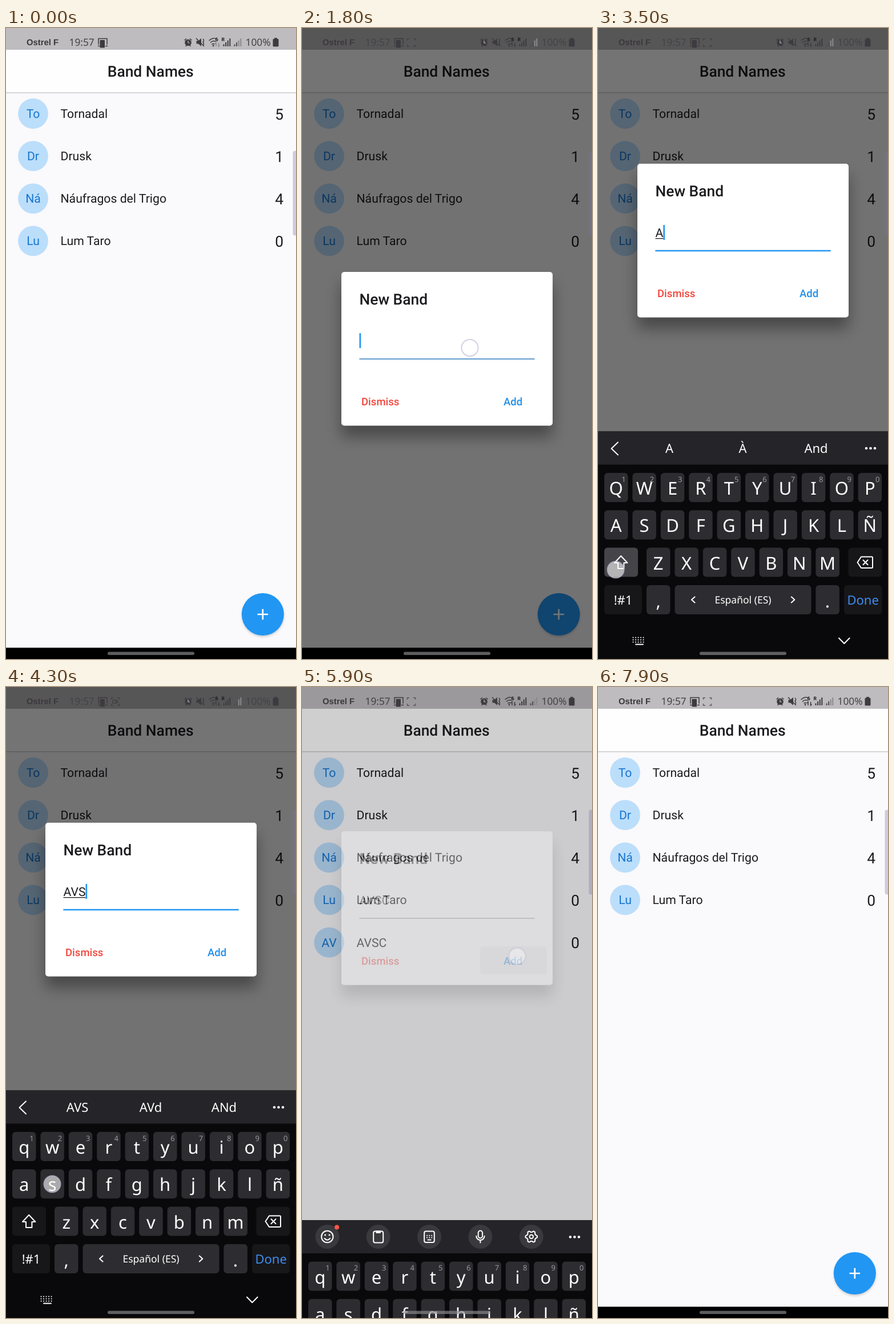
Animation of 508x1102 px, one loop 8 s. Source, as an HTML page:

```html
<!DOCTYPE html>
<html lang="es">
<head>
<meta charset="utf-8">
<title>Band Names</title>
<style>
html, body { margin: 0; width: 100%; height: 100%; overflow: hidden; background: #faf9fc; }
svg { display: block; width: 508px; height: 1102px; }
text { font-family: Roboto, sans-serif; font-size: 21.2px; fill: #1c1b1e; text-rendering: geometricPrecision; }
.title { font-size: 26.4px; font-weight: 500; }
.count { font-size: 26.4px; text-anchor: end; }
.initials { fill: #1976d2; text-anchor: middle; }
.button { font-size: 18.5px; font-weight: 500; }
.status { font: 300 17.3px "Noto Sans", sans-serif; fill: #444246; }
.kb text { font: 300 31px "Noto Sans", sans-serif; fill: #fff; text-anchor: middle; }
.kb .hint { font-size: 13px; fill: #99989c; }
.kb .suggestion { font-size: 22px; font-weight: 400; }
.kb .label { font-size: 22px; font-weight: 400; }
.kb .space { font-size: 17.5px; font-weight: 400; }
.line { fill: none; stroke: #fff; stroke-width: 2; stroke-linecap: round; stroke-linejoin: round; }
.ink { fill: none; stroke: #3d3b3f; stroke-width: 1.5; }
.solid { fill: #3d3b3f; }
</style>
</head>
<body>
<svg id="stage" viewBox="0 0 508 1102"></svg>
<script>
const LOOP = 8000, STEP = 100, ROW = 74.15, NEW_ROW_Y = 409;
const bands = [['Tornadal', 5], ['Drusk', 1], ['Náufragos del Trigo', 4], ['Lum Taro', 0]];
const newBand = ['AVSC', 0];

// Markup helpers
const rect = (x, y, w, h, fill, r = 0, extra = '') =>
  `<rect x="${x}" y="${y}" width="${w}" height="${h}" rx="${r}" fill="${fill}" ${extra}/>`;
const circle = (x, y, r, fill, extra = '') =>
  `<circle cx="${x}" cy="${y}" r="${r}" fill="${fill}" ${extra}/>`;
const text = (x, y, value, cls = '', extra = '') =>
  `<text x="${x}" y="${y}" class="${cls}" ${extra}>${value}</text>`;
const path = (d, cls = 'line', extra = '') => `<path d="${d}" class="${cls}" ${extra}/>`;

const bandRow = ([name, votes], i) => {
  const y = 149.5 + i * ROW;
  return circle(47.5, y, 26.4, '#bbdefb') + text(47.5, y + 7.5, name.slice(0, 2), 'initials') +
    text(95.5, y + 7.5, name) + text(486, y + 10.2, votes, 'count');
};

const trash = `<path transform="translate(13.2 430.6) scale(1.323)" fill="#241313" fill-rule="evenodd"
  d="M6 19c0 1.1.9 2 2 2h8c1.1 0 2-.9 2-2V7H6zM8 9h8v10H8zM15.5 4l-1-1h-5l-1 1H5v2h14V4z"/>`;

const app = () => `
  ${rect(0, 0, 508, 1102, '#faf9fc')}
  ${bands.map(bandRow).join('')}
  <clipPath id="rowClip"><rect id="rowWindow" x="0" width="508"/></clipPath>
  <g id="newRow" clip-path="url(#rowClip)">
    <clipPath id="swipeClip"><rect id="swipeWindow" x="0" y="409" height="75"/></clipPath>
    <g clip-path="url(#swipeClip)">${rect(0, NEW_ROW_Y, 508, ROW, '#f44336')}${trash}</g>
    <g id="swiped">
      <circle id="ripple" cx="255" cy="430" fill="#000" fill-opacity=".028"/>
      ${bandRow(newBand, 4)}
    </g>
  </g>
  ${rect(0, 112, 508, 1.6, '#cdccd0')}${rect(0, 113.6, 508, 1.4, '#eeedf0')}
  ${rect(0, 38, 508, 74, '#fefefe')}
  ${text(253.2, 85.2, 'Band Names', 'title', 'text-anchor="middle"')}
  ${circle(450, 1026.5, 36, '#000', 'opacity=".24" style="filter:blur(2.5px)"')}
  ${circle(449.8, 1024, 37, '#2196f3')}
  ${path('M440.5 1024H459.1M449.8 1014.7V1033.3', 'line', 'style="stroke-width:2.7;stroke-linecap:butt"')}
  ${rect(0, 0, 508, 38, '#bebcbf')}`;

const dialog = () => `
  ${rect(69, 20, 370, 268, '#000', 5, 'opacity=".36" style="filter:blur(13px)"')}
  ${rect(69, 0, 370, 268.5, '#fff', 5)}
  ${text(100.5, 57, 'New Band', 'title')}
  <text id="field" x="100.5" y="127.5"></text>
  ${rect(100.5, 130, 0, 1.3, '#1c1b1e', 0, 'id="composing"')}
  ${rect(0, 107, 2.7, 26, '#2196f3', 0, 'id="caret"')}
  <line id="idleLine" x1="100.5" x2="407.5" y1="152" y2="152" stroke="#8a898c" stroke-width="1.4"/>
  <line id="focusLine" x1="100.5" x2="407.5" y1="152" y2="152" stroke="#2196f3"/>
  ${rect(312, 201, 117, 49, '#000', 5, 'id="addPress" opacity=".06"')}
  ${text(104, 233, 'Dismiss', 'button', 'style="fill:#f0463c"')}
  ${text(353, 233, 'Add', 'button', 'style="fill:#2390ea"')}`;

const PITCH = 49.4;
const keyBox = (x, y, w = 41.5, dark = false, id = '') =>
  rect(x, y, w, 51, dark ? '#171719' : '#2d2c30', 6, id && `id="${id}"`);
const letterRow = (letters, x, y, hints = '') => [...letters].map((c, i) => {
  const left = x + i * PITCH, mid = left + 20.7;
  return keyBox(left, y) + text(mid, y + 38, c, 'letter') +
    (hints ? text(left + 34, y + 15.5, hints[i], 'hint') : '');
}).join('');

const toolIcons = () => `
  ${[44.3, 133.7, 223, 312.4, 401.8].map(x => circle(x, 733.5, 21, '#3a393d')).join('')}
  ${circle(44.3, 733.5, 10.2, 'none', 'class="line"')}
  ${path('M39.5 736.5Q44.3 742 49.1 736.5')}
  ${circle(40.6, 730.5, 1.5, '#fff')}${circle(48, 730.5, 1.5, '#fff')}
  ${circle(61, 717, 4, '#fb5747')}
  ${rect(125.2, 724, 17, 20, 'none', 3, 'class="line"')}${rect(129.5, 723, 8.4, 4.5, '#fff', 1)}
  ${rect(214.2, 724, 17.6, 19.5, 'none', 3, 'class="line"')}
  ${path('M219 731.5h8.5M219 735h8.5', 'line', 'stroke-dasharray="0.1 4"')}${path('M220.5 739h5')}
  ${rect(308.7, 723, 7.4, 13, 'none', 3.7, 'class="line"')}
  ${path('M305.3 732.5a7.1 7.1 0 0 0 14.2 0M312.4 740v4')}
  ${path(gear(401.8, 733.5))}${circle(401.8, 733.5, 3.2, 'none', 'class="line"')}`;

function gear(cx, cy) {
  const points = Array.from({ length: 48 }, (_, i) => {
    const a = i / 48 * Math.PI * 2, r = 9.1 + 1.2 * Math.tanh(3 * Math.cos(a * 6 + Math.PI));
    return `${(cx + r * Math.sin(a)).toFixed(1)} ${(cy + r * Math.cos(a)).toFixed(1)}`;
  });
  return `M${points.join('L')}Z`;
}

const keyboard = () => `
  ${rect(0, 704.5, 508, 398, '#09090c')}
  ${rect(0, 704.5, 508, 58, '#252428')}
  <g id="tools">${toolIcons()}</g>
  <g id="suggestions">
    ${path('M35 723.5L23.5 734.5L35 745.5')}
    ${[125, 253.5, 382].map(x => text(x, 741.5, '', 'suggestion')).join('')}
  </g>
  ${[470, 477.5, 485].map(x => circle(x, 734, 2.3, '#fff')).join('')}
  ${letterRow('QWERTYUIOP', 11, 777, '1234567890')}
  ${letterRow('ASDFGHJKLÑ', 11, 842.3)}
  ${keyBox(11, 907.6, 59, true, 'shiftKey')}
  ${path('M40.2 922L29 934H35V944H45.4V934H51.4Z', 'line', 'id="shiftIcon"')}
  ${letterRow('ZXCVBNM', 85, 907.6)}
  ${keyBox(438.5, 907.6, 59, true)}
  ${path('M461 923.5H479.5Q481 923.5 481 925V941.5Q481 943 479.5 943H461L454.5 933.2ZM464.5 929.2l8 8m0 -8l-8 8')}
  ${keyBox(11, 973, 66, true)}${text(44, 1006.5, '!#1', 'label')}
  ${keyBox(85, 973)}${text(105.7, 1012, ',')}
  ${keyBox(134.5, 973, 239)}${text(254, 1005, 'Español (ES)', 'space')}
  ${path('M169.5 993.5L164 998.5L169.5 1003.5M338.8 993.5L344.3 998.5L338.8 1003.5')}
  ${keyBox(381.4, 973)}${text(402, 1012, '.')}
  ${keyBox(431, 973, 66.5, true)}${text(464.2, 1006.5, 'Done', 'label', 'style="fill:#3f8df0"')}
  ${path('M61.5 1064.5H84M61.5 1068.5H84M61.5 1072.5H84', 'line', 'stroke-dasharray="0.1 4.4"')}
  ${path('M66 1076.5H79')}
  ${path('M422 1065.5L431.3 1075L440.6 1065.5')}`;

const bars = (x, n, color) => Array.from({ length: n }, (_, i) =>
  rect(x + i * 3.6, 28.5 - i * 3.4, 2, 3.5 + i * 3.4, color)).join('');

const statusBar = () => `
  <text x="36" y="30" style="font:bold 14.8px 'Liberation Sans',sans-serif;fill:#3a383c">Ostrel F</text>
  ${text(110.5, 31, '19:57', 'status')}
  ${path('M162 29V18.5H177V29M161 31.5h3M174 31.5h4', 'ink')}${rect(164.5, 21, 8.5, 13.5, '#3d3b3f', 1)}
  <g id="recording">
    ${path('M184.5 22V18.7H188M195 18.7H198.5V22M198.5 29V32.3H195M188 32.3H184.5V29', 'ink', 'opacity=".7"')}
    <g id="camera">${rect(187, 22.7, 6, 5.8, 'none', 1, 'class="ink" style="stroke-width:1.2"')}${path('M193 25.6L196 23V28.3Z', 'solid')}</g>
  </g>
  ${circle(319, 25.5, 5.8, '#3d3b3f')}${path('M312.5 21.5l3.5 -3M325.5 21.5l-3.5 -3M314.5 32l2 -2M323.5 32l-2 -2', 'ink')}
  ${path('M319 22v4h3', 'ink', 'style="stroke:#bbb;stroke-width:1.2"')}
  ${path('M333.5 22.5h3.5l5 -4.5v14l-5 -4.5h-3.5Z', 'solid')}${path('M333 18L347 32M345 19q3 2.5 0 5.5q3 3 0 6', 'ink')}
  ${path('M355.5 22Q363 15.5 369 19.5M358 25.5Q363 21 367.5 24M360.5 28.5Q363 26.5 365.5 28.5', 'ink')}
  ${circle(363, 31, 1.4, '#3d3b3f')}
  ${text(366.5, 22.5, '6', '', 'style="font-size:9px;font-weight:700"')}
  ${path('M368 32V26l-1.8 2M372.5 26v6l1.8 -2', 'ink', 'id="traffic"')}
  ${text(377.5, 23, 'R', '', 'style="font-size:8.5px;font-weight:700"')}${bars(380.5, 4, '#3d3b3f')}
  ${bars(399.5, 2, '#4f4d51')}${rect(406.7, 21.7, 2, 10.3, '#8b898d')}${rect(410.3, 18.3, 2, 13.7, '#8b898d')}
  ${text(419.5, 31.2, '100%', 'status')}
  ${rect(467.5, 19, 10, 13.5, '#3d3b3f', 1.5)}${rect(470, 17.3, 5, 2.5, '#3d3b3f')}`;

document.getElementById('stage').innerHTML = `
  ${app()}
  ${rect(0, 0, 508, 1102, '#000', 0, 'id="scrim"')}
  <g id="dialog">${dialog()}</g>
  ${statusBar()}
  ${rect(502.5, 214.5, 12, 148, 'rgb(130,115,160)', 4, 'opacity=".35"')}
  ${rect(0, 1082.3, 508, 20, '#000')}
  <g id="keyboard" class="kb">${keyboard()}</g>
  ${rect(178, 1089.5, 152, 5.4, '#8f8e91', 2.7, 'opacity=".65"')}
  <circle id="touch" r="14.6" fill="#fff" fill-opacity=".6" stroke="#bdb9d6" stroke-opacity=".65" stroke-width="2"/>`;

const $ = id => document.getElementById(id);
const set = (id, attrs) => { for (const k in attrs) $(id).setAttribute(k, attrs[k]); };
const show = (id, on) => { $(id).style.display = on ? '' : 'none'; };
const letters = [...document.querySelectorAll('.letter')].map(node => [node, node.textContent]);
const suggestionNodes = [...document.querySelectorAll('.suggestion')];

// Motion tables: [time, value]
const track = (...steps) => t => {
  const i = steps.findIndex(s => s[0] > t);
  if (i === 0) return steps[0][1];
  if (i < 0) return steps[steps.length - 1][1];
  const [t0, a] = steps[i - 1], [t1, b] = steps[i];
  return a + (b - a) * (t - t0) / (t1 - t0);
};
const latest = (steps, t) => steps.filter(s => s[0] <= t).pop();
const within = (t, spans) => spans.some(([a, b]) => t >= a && t < b);

const dialogAlpha = track([1000, 0], [1100, .8], [1200, 1], [5800, 1], [5900, .34], [6000, 0]);
const dialogY = track([1900, 426], [2000, 400], [2100, 320], [2200, 255], [2300, 237], [5800, 237], [5900, 252], [6000, 330]);
const keyboardY = track([1900, 398], [2000, 300], [2100, 120], [2200, 25], [2300, 0], [5800, 0], [5900, 226.5], [6000, 365], [6100, 398]);
const focus = track([1770, 0], [1800, .5], [1970, 1], [5800, 1], [5880, 0]);
const swipe = track([7000, 0], [7100, 46], [7200, 113], [7300, 176], [7400, 300], [7500, 460], [7550, 508]);
const rowScale = track([7670, 1], [7700, .8], [7800, .08], [7850, 0]);
const rippleSize = track([6900, 12], [7200, 52], [7400, 80]);
const dragX = track([6900, 255], [7000, 275], [7100, 325], [7200, 392], [7300, 455]);
const dragY = track([6900, 432], [7200, 440]);

const typed = [[1780, ''], [3100, 'A'], [3800, 'AV'], [4300, 'AVS'], [5000, 'AVSC']];
const hints = [[3100, 'A', 'À', 'And'], [3800, 'AV', 'Av', 'Ave'], [4300, 'AVS', 'AVd', 'ANd'],
  [5000, 'AVS|C', 'AV|E', 'AN|D'], [5300, 'AVSC', 'AVE', 'AND']];
const upperCase = [[0, 3100], [3500, 3800], [4100, 4300], [4700, 5000]];
const shiftTaps = [[3500, 3650], [4050, 4200], [4650, 4800]];
const FADE = 82;
const touches = [
  [900, 1050, 450, 1024], [1700, 1850, 294, 558.5], [3000, 3150, 31, 868],
  ...shiftTaps.map(([a, b]) => [a, b, 31, 946]),
  [3750, 3900, 254, 933], [4250, 4400, 81, 868], [4930, 5030, 205, 934],
  [5700, 5870, 377, 470], [6900, 7330]
];

function render(t) {
  // App list
  show('newRow', t >= 5850 && t < 7850);
  const dx = swipe(t);
  set('rowWindow', { y: NEW_ROW_Y, height: ROW * rowScale(t) });
  set('swipeWindow', { width: dx });
  set('swiped', { transform: `translate(${dx} 0)` });
  set('ripple', { r: rippleSize(t) });
  show('ripple', t >= 6900 && t < 7500);

  // Dialog
  const alpha = dialogAlpha(t), k = focus(t);
  set('scrim', { opacity: .54 * alpha });
  set('dialog', { opacity: alpha, transform: `translate(0 ${dialogY(t)})` });
  show('dialog', alpha > 0);
  const [since, value] = latest(typed, t) || [0, ''];
  $('field').textContent = value;
  const width = value && alpha ? $('field').getComputedTextLength() : 0;
  set('composing', { width: t < 5800 ? width : 0 });
  set('caret', { x: 100.5 + width });
  show('caret', t >= 1780 && t < 5800 && (t - since) % 1000 < 500);
  set('focusLine', { opacity: k, 'stroke-width': 1.4 + 1.3 * k });
  show('addPress', t >= 5700);

  // Keyboard
  const ky = keyboardY(t);
  show('keyboard', ky < 398);
  set('keyboard', { transform: `translate(0 ${ky})` });
  const upper = within(t, upperCase), pressed = within(t, shiftTaps);
  for (const [node, c] of letters) node.textContent = upper ? c : c.toLowerCase();
  set('shiftIcon', { style: `fill:${upper && !pressed ? '#fff' : 'none'}` });
  set('shiftKey', { fill: pressed ? '#454448' : '#171719' });
  const hint = t < 5800 && latest(hints, t);
  show('suggestions', hint);
  show('tools', !hint);
  if (hint) suggestionNodes.forEach((node, i) => {
    const [sure, rest = ''] = hint[i + 1].split('|');
    node.innerHTML = `${sure}<tspan fill="#8b8a8e">${rest}</tspan>`;
  });

  // Status icons and touch marker
  show('recording', t >= 100);
  show('camera', t % 1000 < 500);
  set('traffic', { opacity: t < 100 ? .4 : 1 });
  const touch = touches.find(([a, b]) => t >= a && t < b + FADE);
  show('touch', touch);
  if (touch) {
    const [, end, x = dragX(t), y = dragY(t)] = touch;
    set('touch', { cx: x, cy: y, opacity: Math.min(1, 1 - (t - end) / FADE) });
  }
}

const start = performance.now();
function tick() {
  const t = (performance.now() - start + 5) % LOOP;
  render(Math.floor(t / STEP) * STEP);
  requestAnimationFrame(tick);
}
tick();
</script>
</body>
</html>
```
